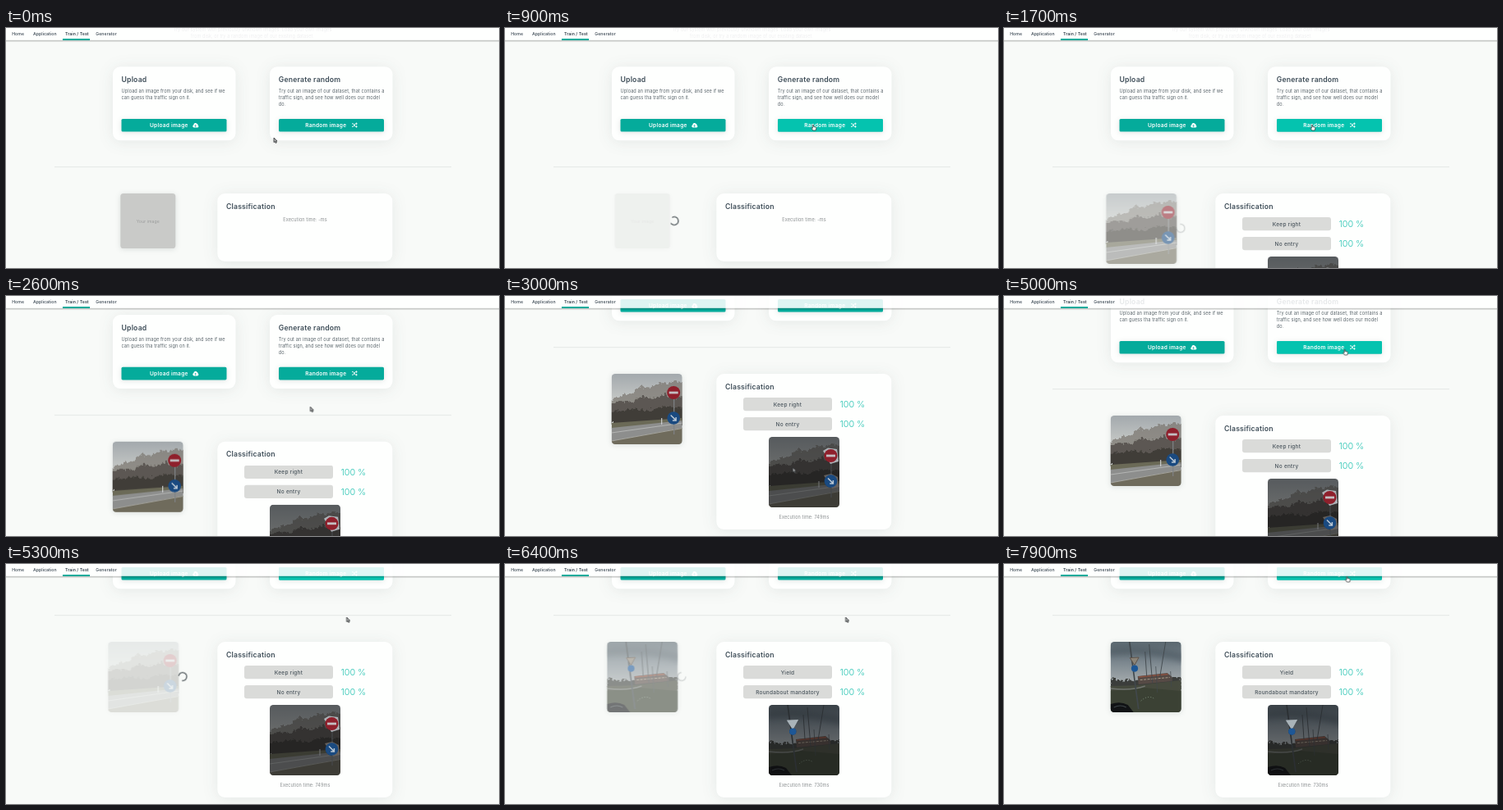
Write an HTML page that moves like this. It is 600x293 px and loops after 8000 ms.

```html
<!DOCTYPE html>
<html lang="en">
<head>
<meta charset="utf-8">
<title>Traffic sign tester</title>
<style>
html, body { margin: 0; width: 100%; height: 100%; overflow: hidden; background: #f8faf8; }
svg { display: block; width: 100vw; height: 100vh; }
text { font-family: Inter, "Open Sans", sans-serif; fill: #5b656c; font-size: 5.55px; letter-spacing: .1px; }
.nav text { font-size: 5.2px; font-weight: 500; fill: #35434e; letter-spacing: .06px; }
.h { font-size: 8.7px; font-weight: 600; fill: #3f4e59; letter-spacing: .17px; }
.btn { font-size: 6.55px; font-weight: 600; fill: #fff; letter-spacing: .26px; }
.row { font-size: 6.5px; font-weight: 500; fill: #4a555d; letter-spacing: .24px; text-anchor: middle; }
.pct { font-size: 10.8px; font-weight: 300; fill: #22c2b0; letter-spacing: 0; }
.mid { text-anchor: middle; }
.time { font-size: 5.5px; fill: #8a8e90; text-anchor: middle; }
.card { fill: #fefffe; filter: drop-shadow(0 2px 9px rgba(30, 50, 50, .09)); }
.soft { filter: drop-shadow(0 1px 3px rgba(30, 50, 50, .14)); }

.page, .result, .fade, .shift, .load, .place, .spin, .hover, .pointer, .g0, .g1, .g2, .arrow, .hand {
  animation: 8s linear infinite;
}
.page { animation-name: scroll; }
@keyframes scroll {
  0%, 30.8% { transform: translateY(0); animation-timing-function: ease-in-out; }
  36%, 51.1% { transform: translateY(-107px); animation-timing-function: ease-out; }
  53%, 63.3% { transform: translateY(-56px); animation-timing-function: ease-out; }
  65.6%, 100% { transform: translateY(-107px); }
}
.result { animation-name: grow; animation-timing-function: step-end; }
@keyframes grow { 0% { height: 83px; } 18.62%, 100% { height: 190px; } }

.g0, .g1, .g2, .arrow, .hand, .shift, .place { animation-timing-function: step-end; }
.g0 { animation-name: g0; }
.g1 { animation-name: g1; }
.g2 { animation-name: g2; }
@keyframes g0 { 0% { opacity: 1; } 18.62%, 100% { opacity: 0; } }
@keyframes g1 { 0% { opacity: 0; } 18.62% { opacity: 1; } 77.4%, 100% { opacity: 0; } }
@keyframes g2 { 0% { opacity: 0; } 77.4%, 100% { opacity: 1; } }

.fade { animation-name: fade; }
@keyframes fade {
  0%, 7% { opacity: 1; }
  10%, 18.62% { opacity: .2; }
  24.3%, 63.1% { opacity: 1; }
  65.6%, 77.4% { opacity: .2; }
  83%, 100% { opacity: 1; }
}
.shift { animation-name: shift; }
@keyframes shift {
  0% { transform: none; }
  7% { transform: translateX(-5.5px); }
  26.9% { transform: none; }
  63.1% { transform: translateX(-5.5px); }
  85.6%, 100% { transform: none; }
}
.load { animation-name: load; }
@keyframes load {
  0%, 7% { opacity: 0; }
  9%, 18.62% { opacity: 1; }
  21.25% { opacity: .25; }
  24%, 63.1% { opacity: 0; }
  65%, 77.4% { opacity: 1; }
  80% { opacity: .25; }
  83%, 100% { opacity: 0; }
}
.place { animation-name: place; }
@keyframes place {
  0% { transform: translate(206px, 235.5px); }
  18.62%, 100% { transform: translate(215px, 244.5px); }
}
.spin { animation-name: spin; }
@keyframes spin { from { transform: rotate(-240deg); } to { transform: rotate(3600deg); } }

.hover { animation-name: hover; }
@keyframes hover {
  0%, 3.6% { opacity: 0; }
  5%, 31.2% { opacity: 1; }
  32.5%, 55.5% { opacity: 0; }
  57%, 67.5% { opacity: 1; }
  69.5%, 95% { opacity: 0; }
  96.5%, 100% { opacity: 1; }
}
.pointer { animation-name: pointer; }
@keyframes pointer {
  0%, .6% { transform: translate(326px, 134px); animation-timing-function: ease-in-out; }
  4.9%, 30.8% { transform: translate(375px, 118px); animation-timing-function: ease-in-out; }
  36.5%, 43% { transform: translate(350.3px, 209.5px); animation-timing-function: ease-in; }
  45.5% { transform: translate(399px, 140px); animation-timing-function: ease-out; }
  47.5%, 52.5% { transform: translate(376.9px, 105px); animation-timing-function: ease-in-out; }
  60%, 88% { transform: translate(414.6px, 65px); animation-timing-function: ease-in-out; }
  98.5%, 100% { transform: translate(417.5px, 15px); }
}
.arrow { animation-name: arrow; }
.hand { animation-name: hand; }
@keyframes arrow {
  0% { opacity: 1; } 3.6% { opacity: 0; } 31.5% { opacity: 1; } 57% { opacity: 0; }
  64.5% { opacity: 1; } 95.5%, 100% { opacity: 0; }
}
@keyframes hand {
  0% { opacity: 0; } 3.6% { opacity: 1; } 31.5% { opacity: 0; } 57% { opacity: 1; }
  64.5% { opacity: 0; } 95.5%, 100% { opacity: 1; }
}
</style>
</head>
<body>
<svg viewBox="0 0 600 293" preserveAspectRatio="none">
<defs>
  <linearGradient id="under" x2="0" y2="1">
    <stop stop-color="#000" stop-opacity=".28"/><stop offset="1" stop-color="#000" stop-opacity="0"/>
  </linearGradient>
  <linearGradient id="dusk" x2="0" y2="1">
    <stop stop-color="#a3a9ad"/><stop offset=".36" stop-color="#c3c6c4"/>
  </linearGradient>
  <linearGradient id="cloud" x2="0" y2="1">
    <stop stop-color="#5a676f"/><stop offset=".25" stop-color="#76828a"/><stop offset=".55" stop-color="#a0a7aa"/>
  </linearGradient>
  <clipPath id="round"><rect width="86" height="86" rx="4.5"/></clipPath>
  <filter id="ragged" x="-.1" y="-.3" width="1.2" height="1.6">
    <feTurbulence type="fractalNoise" baseFrequency=".28" numOctaves="2" seed="4"/>
    <feDisplacementMap in="SourceGraphic" scale="9" xChannelSelector="R" yChannelSelector="G"/>
    <feGaussianBlur stdDeviation=".35"/>
  </filter>
  <filter id="haze"><feGaussianBlur stdDeviation="3"/></filter>

  <g id="signs">
    <circle cx="75.5" cy="23" r="8" fill="#8f202c"/>
    <rect x="70" y="21.6" width="11" height="2.8" fill="#c3bfc2"/>
    <circle cx="75.5" cy="54" r="7.8" fill="#1a4a80"/>
    <path d="M72 50.5l6.4 6.4m0-4v4.2h-4.2" fill="none" stroke="#b9c6d2" stroke-width="1.5"/>
  </g>
  <g id="road">
    <rect width="86" height="86" fill="url(#dusk)"/>
    <g filter="url(#ragged)">
      <path d="M-5 33L12 27 24 24 36 15 48 17 58 11 68 12 78 8 92 14V62H-5z" fill="#7d7872" opacity=".75"/>
      <path d="M-5 40L10 33 26 35 38 27 52 30 64 25 76 30 92 25V62H-5z" fill="#544f4a" opacity=".85"/>
      <path d="M-5 48L20 43 45 45 64 40 92 42V62H-5z" fill="#3f3c38"/>
    </g>
    <path d="M0 60L86 54V60L0 67z" fill="#6b6a57"/>
    <path d="M0 66L86 57V67L0 83z" fill="#8d8e8d"/>
    <path d="M0 72L86 60" stroke="#c5c6c4" stroke-width=".7"/>
    <path d="M0 82L86 66V86H0z" fill="#6f6b5c"/>
    <path d="M0 82L86 66.5" stroke="#b1b2ad" stroke-width=".8"/>
    <path d="M61 54V62" stroke="#d5d7d8" stroke-width="1.1"/>
    <path d="M76 14V74" stroke="#7f8386" stroke-width="1.2"/>
    <use href="#signs"/>
  </g>

  <circle id="blue" cx="29.3" cy="32.6" r="4.1" fill="#1d5796"/>
  <path id="wedge" d="M23.6 19.6L34.4 19 29.2 28.6z"/>
  <g id="ring">
    <rect width="86" height="86" fill="url(#cloud)"/>
    <path d="M-5 8Q30 1 92 14V26Q45 12 -5 18z" fill="#48555d" opacity=".55" filter="url(#haze)"/>
    <path d="M0 45L10 47 22 46 34 48 50 44 70 44 86 43V58H0z" fill="#3b3d3a" filter="url(#ragged)"/>
    <path d="M33 42L69 38 75 43V48L34 52z" fill="#564a45"/>
    <path d="M34 43L70 39.5" stroke="#8a5141" stroke-width="1.4"/>
    <path d="M36 46.5L72 43.5" stroke="#a39a88" stroke-width="1" stroke-dasharray="3 1.4"/>
    <path d="M0 54L34 53 86 47V86H0z" fill="#464a3e"/>
    <path d="M0 60L40 56 86 60V86H0z" fill="#3b4134"/>
    <path d="M0 57Q26 60 42 54" fill="none" stroke="#70746f" stroke-width="1.4"/>
    <path d="M37 72Q46 64 54 70" fill="none" stroke="#819580" stroke-width="1" stroke-dasharray="1 2.2"/>
    <g fill="none" stroke="#41484c">
      <path d="M23 0L34 82" stroke-width="1.7"/>
      <path d="M47 3L51 50M67 0L60 43M42 12L44 42" stroke-width=".9"/>
      <path d="M55 30L57 62M73 36L74 55" stroke-width=".7"/>
    </g>
    <path d="M0 76Q12 72 21 77L28 86H0z" fill="#111315"/>
    <path d="M4 80Q12 76 19 80" fill="none" stroke="#3d4448" stroke-width="1.2"/>
    <use href="#wedge" fill="#8b8478" stroke="#5f5349"/>
    <use href="#blue"/>
  </g>

  <g id="rows">
    <rect x="290" y="231" width="108" height="16.2" rx="3"/>
    <rect x="290" y="255" width="108" height="16.2" rx="3"/>
  </g>
  <g id="score">
    <use href="#rows" fill="#dadbd9"/>
    <text class="pct" x="407.5" y="242.8">100 %</text>
    <text class="pct" x="407.5" y="266.8">100 %</text>
  </g>
</defs>

<rect width="600" height="293" fill="#f8faf8"/>

<g class="page">
  <g class="mid" font-weight="300">
    <text x="300" y="4.4">Try our system with previously unknown images. Load your own images</text>
    <text x="300" y="12.4">from disk, or try a random image of our existing dataset.</text>
  </g>

  <rect class="card" x="130" y="47.3" width="149.5" height="90" rx="9"/>
  <text class="h" x="140.5" y="66.2">Upload</text>
  <text x="140.5" y="79.2">Upload an image from your disk, and see if we</text>
  <text x="140.5" y="87.2">can guess tha traffic sign on it.</text>
  <rect class="soft" x="140.5" y="111" width="128" height="15.6" rx="1.6" fill="#05ab9b"/>
  <text class="btn" x="175" y="121.4">Upload image</text>
  <g transform="translate(227 115.4)">
    <path d="M1.7 6.2a1.7 1.7 0 0 1-.3-3.3 2.2 2.2 0 0 1 4.1-1.2 1.5 1.5 0 0 1 1.1 1.7 1.5 1.5 0 0 1-.6 2.8z" fill="#fff"/>
    <path d="M3.6 5.6V3.2M2.5 4.1L3.6 3l1.1 1.1" fill="none" stroke="#05ab9b" stroke-width=".7"/>
  </g>

  <rect class="card" x="321" y="47.3" width="149.5" height="90" rx="9"/>
  <text class="h" x="331.8" y="66.2">Generate random</text>
  <text x="331.8" y="79.2">Try out an image of our dataset, that contains a</text>
  <text x="331.8" y="87.2">traffic sign, and see how well does our model</text>
  <text x="331.8" y="95.2">do.</text>
  <rect class="soft" x="332" y="111" width="128" height="15.6" rx="1.6" fill="#05ab9b"/>
  <rect class="hover" x="332" y="111" width="128" height="15.6" rx="1.6" fill="#04c3af"/>
  <text class="btn" x="364.2" y="121.4">Random image</text>
  <path transform="translate(421 116)" d="M0 .8h1.6l2.6 3.6h1.9M0 4.4h1.6L4.2.8h1.9M5-.4L6.3.8 5 2M5 3.2l1.3 1.2L5 5.6"
    fill="none" stroke="#fff" stroke-width=".9"/>

  <rect x="59" y="169.3" width="483" height=".8" fill="#e0e3e1"/>

  <g class="shift"><g class="fade">
    <g class="g0">
      <rect class="soft" x="139.3" y="202" width="67" height="67" rx="3.6" fill="#c9cac8"/>
      <text class="mid" x="172.8" y="238.4" style="font-size:5.2px;font-weight:300;fill:#8d8f8f">Your image</text>
    </g>
    <g class="g1"><g class="soft" transform="translate(129.7 202)"><use href="#road" clip-path="url(#round)"/></g></g>
    <g class="g2"><g class="soft" transform="translate(129.7 202)"><use href="#ring" clip-path="url(#round)"/></g></g>
  </g></g>
  <g class="load"><g class="place">
    <path class="spin" d="M3.5 3.5A4.95 4.95 0 1 1 3.5-3.5" fill="none" stroke="#666d70" stroke-width="1.5"/>
  </g></g>

  <rect class="card result" x="257.3" y="202" width="213" height="83" rx="9"/>
  <text class="h" x="268" y="220.6">Classification</text>
  <text class="time g0" x="364" y="236.4">Execution time: -ms</text>

  <g class="g1">
    <use href="#score"/>
    <text class="row" x="344" y="241.6">Keep right</text>
    <text class="row" x="344" y="265.6">No entry</text>
    <g transform="translate(321 279)"><g clip-path="url(#round)">
      <use href="#road"/>
      <rect width="86" height="86" fill="#0d0e10" opacity=".5"/>
      <path d="M66 17L72 13.5 83 15 85 30 75 33z" fill="#adb2b7"/>
      <path d="M67 47L76 45 84 49 85 61 77 63z" fill="#66605c"/>
      <use href="#signs"/>
    </g></g>
    <text class="time" x="364" y="379">Execution time: 749ms</text>
  </g>
  <g class="g2">
    <use href="#score"/>
    <text class="row" x="344" y="241.6">Yield</text>
    <text class="row" x="344" y="265.6">Roundabout mandatory</text>
    <g transform="translate(321 279)"><g clip-path="url(#round)">
      <use href="#ring"/>
      <rect width="86" height="86" fill="#0d0e10" opacity=".42"/>
      <use href="#wedge" fill="#a9b3b9" stroke="#a9b3b9" stroke-width="2"/>
      <use href="#blue"/>
    </g></g>
    <text class="time" x="364" y="379">Execution time: 730ms</text>
  </g>
</g>

<g class="nav">
  <rect y="14.6" width="600" height="3" fill="url(#under)"/>
  <rect width="600" height="14.8" fill="#fff" opacity=".87"/>
  <text x="7.2" y="9">Home</text>
  <text x="33" y="9">Application</text>
  <text x="72" y="9" style="font-weight:600">Train / Test</text>
  <text x="109.3" y="9">Generator</text>
  <rect x="69" y="13" width="33" height="2" fill="#05ab9b"/>
</g>

<g class="pointer" stroke-linejoin="round">
  <path class="arrow" d="M0 0V5.6L1.3 4.5 2.3 6.5 3.3 6 2.4 4.1H4z" fill="#b4b6b6" stroke="#2d2f30" stroke-width=".8"/>
  <path class="hand" d="M-.6 .5Q0-.2.6.5V2.6L3.2 3.1Q4 3.4 3.8 4.2L3.2 7H-.2L-2 4.4Q-1.9 3.6-.6 4.4z" fill="#fff" stroke="#333" stroke-width=".7"/>
</g>
</svg>
</body>
</html>
```
